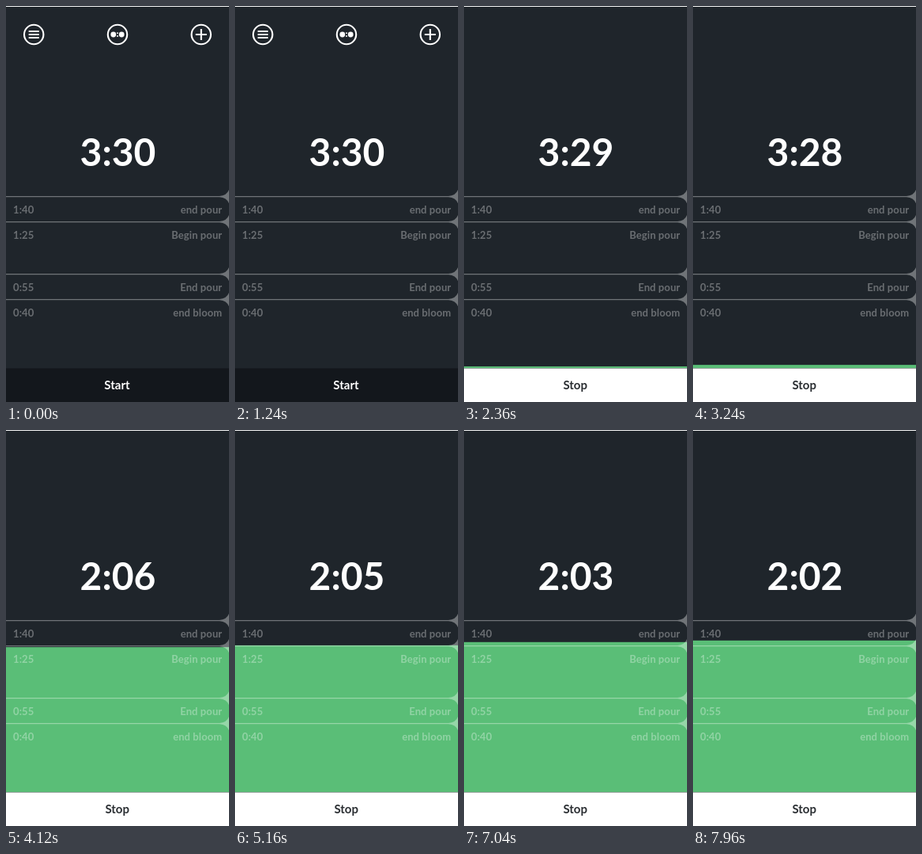
These frames come from a looping animation (282 px wide and 500 px high, 8000 ms). An HTML page:

```html
<!DOCTYPE html>
<html lang="en">
<head>
<meta charset="utf-8">
<title>Brew timer</title>
<style>
  html, body { margin: 0; width: 100%; height: 100%; overflow: hidden; background: #1f252b; }
  svg { display: block; width: 100%; height: 100%; }
  text { font-family: Lato, "Open Sans", sans-serif; font-weight: 700; }
  .clock { font-size: 48px; fill: #fff; text-anchor: middle; }
  .label { font-size: 13px; letter-spacing: .1px; }
  .end { text-anchor: end; }
  .button { font-size: 15px; text-anchor: middle; }
  .icon { fill: none; stroke: #fff; stroke-width: 2.1; }
</style>
</head>
<body>
<svg viewBox="0 0 282 500">
  <rect width="282" height="500" fill="#1f252b"/>
  <rect width="282" height="1" fill="#f4f5f5"/>

  <g id="icons" class="icon">
    <circle cx="35.2" cy="36" r="12.2"/>
    <path d="M28.7 32h13M28.7 36h13M28.7 40h13"/>
    <circle cx="141" cy="36" r="12.2"/>
    <g fill="#fff" stroke="none">
      <circle cx="135.8" cy="36" r="3.4"/>
      <circle cx="146.2" cy="36" r="3.4"/>
      <circle cx="141" cy="34.2" r="1"/>
      <circle cx="141" cy="38" r="1"/>
    </g>
    <circle cx="246.8" cy="36" r="12.2"/>
    <path d="M239.8 36h14M246.8 29v14"/>
  </g>

  <rect id="fillA" width="282" fill="#5abe77"/>
  <rect id="fillB" width="282" fill="#5abe77"/>
  <g id="marks" fill="#fff"></g>

  <text id="clockA" class="clock" x="141.5" y="201.6"></text>
  <text id="clockB" class="clock" x="141.5" y="201.6"></text>

  <rect y="457.5" width="282" height="42.5" fill="#13171c"/>
  <rect id="whiteBar" y="457.5" width="282" height="42.5" fill="#fff"/>
  <text id="start" class="button" x="140.5" y="483.5" fill="#fff">Start</text>
  <text id="stop" class="button" x="140.7" y="483.5" fill="#2a2e32">Stop</text>
</svg>
<script>
  const LOOP = 8000, TOTAL = 210, FLOOR = 457.5;
  const PRESS = 1240, PRESS_LENGTH = 400;
  const DISSOLVE = 3360, DISSOLVE_LENGTH = 560;
  const steps = [[100, 'end pour'], [85, 'Begin pour'], [55, 'End pour'], [40, 'end bloom']];

  const $ = id => document.getElementById(id);
  const clamp = v => Math.min(1, Math.max(0, v));
  const ease = v => v * v * (3 - 2 * v);
  const level = seconds => FLOOR * (1 - seconds / TOTAL);
  const format = s => Math.floor(s / 60) + ':' + String(s % 60).padStart(2, '0');
  const fade = (id, opacity) => $(id).setAttribute('opacity', opacity);

  // Each divider flares into the rounded right corners of its two neighbours.
  $('marks').innerHTML = steps.map(([seconds, name]) => {
    const y = Math.round(level(seconds));
    return `<path opacity=".36" d="M0 ${y}H270Q279 ${y - .5} 282 ${y - 8}V${y + 9.3}Q279 ${y + 1.8} 270 ${y + 1.3}H0Z"/>
      <g class="label" opacity=".33">
        <text x="9" y="${y + 21.5}">${format(seconds)}</text>
        <text class="end" x="273.3" y="${y + 21.5}">${name}</text>
      </g>`;
  }).join('');

  function showRun(key, elapsed, opacity) {
    const y = level(elapsed);
    $('fill' + key).setAttribute('y', y);
    $('fill' + key).setAttribute('height', FLOOR - y);
    $('clock' + key).textContent = format(TOTAL - Math.floor(elapsed));
    fade('fill' + key, opacity);
    fade('clock' + key, opacity);
  }

  function draw() {
    const t = performance.now() % LOOP;
    const pressed = ease(clamp((t - PRESS) / PRESS_LENGTH));
    const later = clamp((t - DISSOLVE) / DISSOLVE_LENGTH);

    fade('icons', 1 - pressed);
    fade('whiteBar', pressed);
    fade('start', 1 - pressed);
    fade('stop', pressed);

    showRun('A', Math.max(0, t - PRESS) / 1000, 1 - later);
    showRun('B', 84 + (t - 3960) / 1000, later);
    requestAnimationFrame(draw);
  }
  draw();
</script>
</body>
</html>
```
